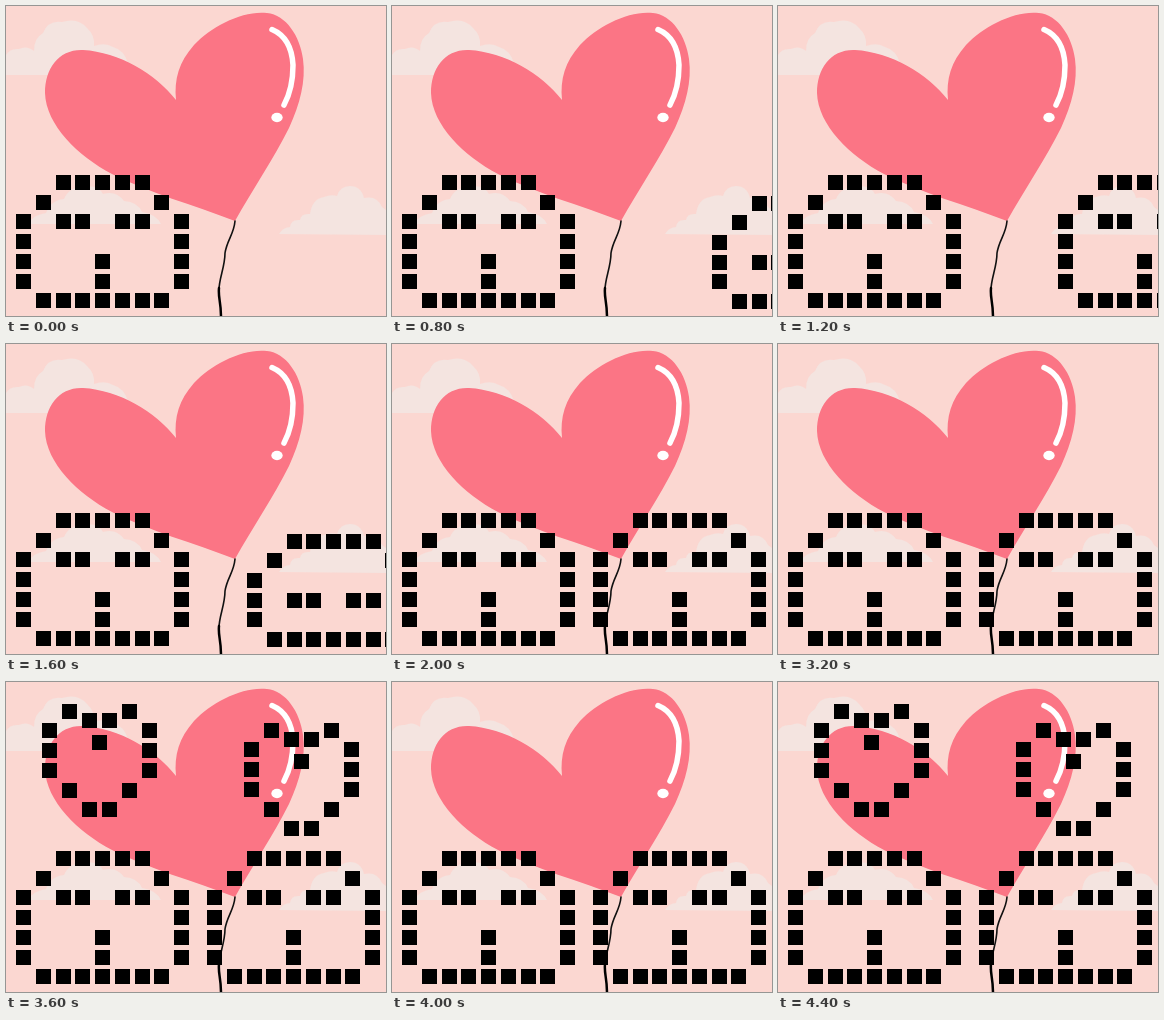
An HTML page for the animation above (4800 ms loop, 380x310 px).

```html
<!DOCTYPE html>
<html lang="en">
<head>
<meta charset="utf-8">
<title>Pixel faces in love</title>
<style>
  html, body { margin: 0; width: 100%; height: 100%; overflow: hidden; background: #fbd7d1; }
  svg { display: block; width: 380px; height: 310px; }
</style>
</head>
<body>
<svg id="stage" viewBox="0 0 380 310" xmlns="http://www.w3.org/2000/svg">
  <rect width="380" height="310" fill="#fbd7d1"/>
  <g fill="#f4e4e0">
    <path d="M0 69V49Q4 42 13 43Q21 39 28 45Q28 32 37 27Q42 14 56 16Q72 11 81 22Q89 29 88 40Q99 36 107 41Q118 44 122 57L140 69Z"/>
    <path d="M22 218Q27 209 40 207Q45 194 58 193Q63 181 77 181Q91 178 97 188Q110 184 118 195Q132 196 136 206Q150 208 155 218Z"/>
    <path d="M273 228Q276 222 284 221Q285 213 294 214Q295 207 304 208Q306 193 318 191Q325 188 331 190Q334 180 344 180Q355 180 358 192Q371 189 376 201L380 204V229Z"/>
  </g>
  <path fill="#fb7585" d="M170 94C150 68 113 46 77 44C53 43 39 62 39 87C40 119 72 150 106 168C143 187 188 199 229 215C247 183 268 152 283 122C294 98 300 75 297 53C294 30 280 9 261 7C238 4 205 20 188 39C173 56 168 73 170 94Z"/>
  <g fill="none" stroke-linecap="round" stroke-linejoin="round">
    <path stroke="#fff" stroke-width="5.5" d="M266 23.500C279 29 286 41 287 59C287 74 284 88 278 99"/>
    <path stroke="#111" stroke-width="1.600" d="M229 215C228 228 221 234 219 247C219 261 213 272 213 284"/>
    <path stroke="#000" stroke-width="2.500" d="M213 282C212 292 215 295 215 311"/>
  </g>
  <ellipse cx="271" cy="111.500" rx="5.700" ry="4.700" fill="#fff"/>
</svg>
<script>
const stage = document.getElementById('stage');
const LOOP = 4800, SIZE = 15;

const TALL = [
  '..#####..',
  '.#.....#.',
  '#.##.##.#',
  '#.......#',
  '#...#...#',
  '#...#...#',
  '.#######.'
];
const SQUAT = [
  '..#####..',
  '.#.....#.',
  '#.......#',
  '#.##.##.#',
  '#.......#',
  '.#######.'
];

const face = (rows, x, y) => rows.flatMap((row, r) =>
  [...row].flatMap((ch, c) => ch === '#' ? [[x + c * 19.75, y + r * 19.7]] : []));

// Left half of a heart outline, mirrored, plus the dip in the middle.
const HALF = [[20, 0], [40, 9], [0, 19], [0, 39], [0, 59], [20, 79], [40, 98]];
const heart = (x, y) => [...HALF, ...HALF.map(([a, b]) => [100 - a, b]), [50, 31]]
  .map(([a, b]) => [x + a, y + b]);

// Each mask holds one digit per 400 ms step.
const sprites = [
  [face(TALL, 10, 169), '111111111111'],
  [face(TALL, 360, 169), '010000000000'],
  [face(SQUAT, 320, 189.6), '001000000000'],
  [face(TALL, 280, 169), '000100000000'],
  [face(SQUAT, 241, 189.6), '000010000000'],
  [face(TALL, 201, 169), '000001111111'],
  [heart(36, 22), '000000110101'],
  [heart(238, 41), '000000010101']
];

for (const [cells, mask] of sprites) {
  const path = document.createElementNS(stage.namespaceURI, 'path');
  path.setAttribute('d', cells.map(([x, y]) =>
    `M${Math.round(x)} ${Math.round(y)}h${SIZE}v${SIZE}h-${SIZE}z`).join(''));
  path.setAttribute('shape-rendering', 'crispEdges');
  stage.append(path);

  const frames = [...mask, mask.at(-1)].map((on, i) =>
    ({ opacity: +on, offset: i / mask.length, easing: 'steps(1, end)' }));
  path.animate(frames, { duration: LOOP, iterations: Infinity });
}
</script>
</body>
</html>
```
